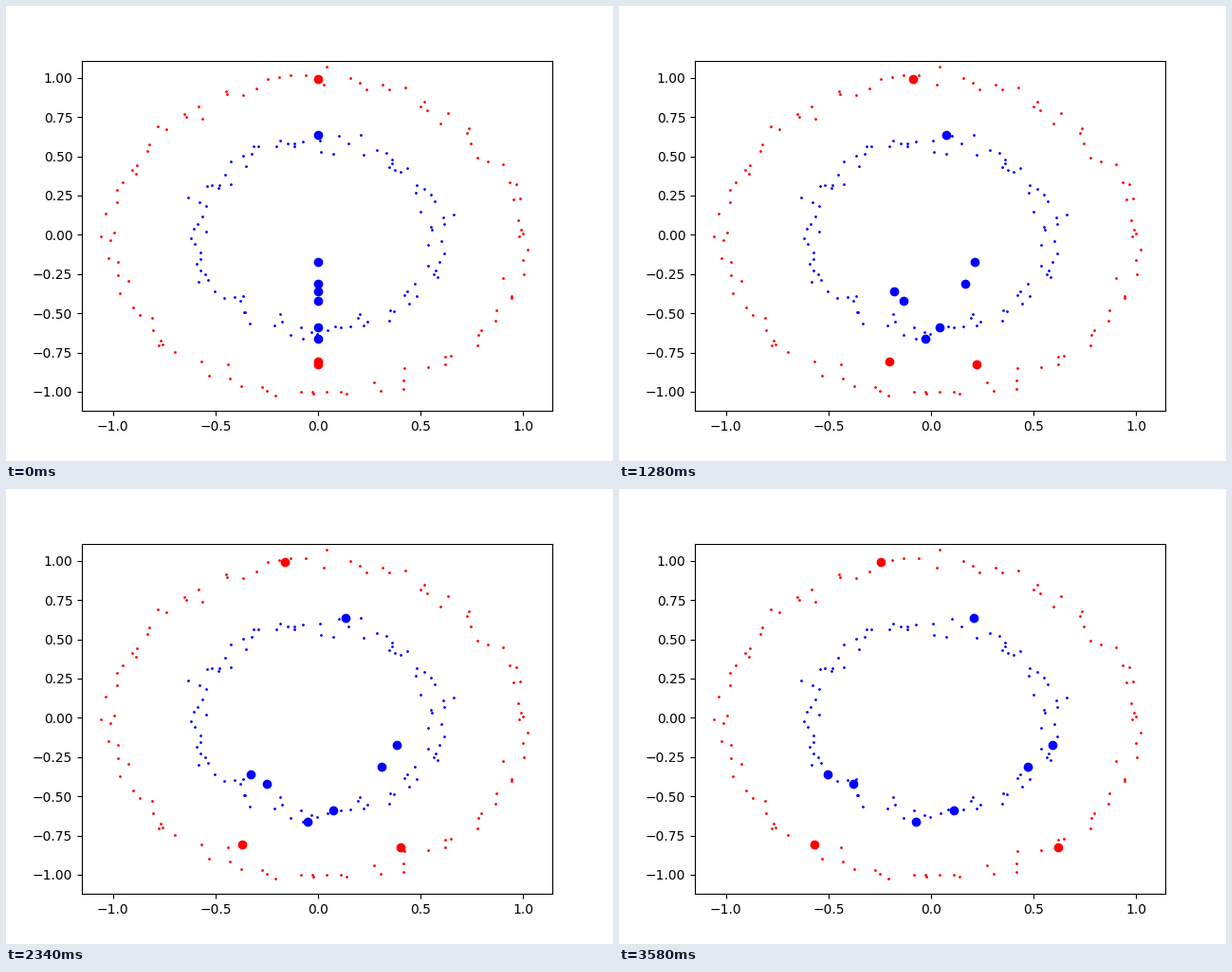
Animation of 640 by 480 pixels, one loop 3.6 s. Source, as a matplotlib script:

```python
import numpy as np
import matplotlib.pyplot as plt
from matplotlib.animation import FuncAnimation

FRAMES, INTERVAL = 180, 20
DOTS = 100      # dots per ring
NOISE = 0.035
ORIGIN_X, UNIT_X = 328.95, 216.2   # stage position of 0 and length of 1
ORIGIN_Y, UNIT_Y = 241.36, 165.6

# Places on the rings where the big dots arrive.
OUTER_ENDS = [(-0.245, 0.9925), (-0.568, -0.807), (0.618, -0.825)]
INNER_ENDS = [(0.208, 0.636), (0.591, -0.173), (0.472, -0.312),
              (-0.504, -0.360), (-0.379, -0.420), (0.111, -0.590),
              (-0.074, -0.662)]

rng = np.random.default_rng(7)


def noisy_ring(radius, ends):
    """Evenly spaced dots with jitter; the nearest ones move onto the ends."""
    step = 2 * np.pi / DOTS
    angles = step * np.arange(DOTS)
    ring = radius * np.column_stack([np.cos(angles), np.sin(angles)])
    ring += rng.normal(scale=NOISE, size=ring.shape)
    for x, y in ends:
        ring[round(np.arctan2(y, x) / step) % DOTS] = x, y
    return ring


fig, ax = plt.subplots(figsize=(6.4, 4.8), dpi=100)
ax.set_xlim((80 - ORIGIN_X) / UNIT_X, (576 - ORIGIN_X) / UNIT_X)
ax.set_ylim((ORIGIN_Y - 427.2) / UNIT_Y, (ORIGIN_Y - 57.6) / UNIT_Y)

movers = []
for radius, ends, color in [(1.0, OUTER_ENDS, "red"),
                            (0.6, INNER_ENDS, "blue")]:
    ax.plot(*noisy_ring(radius, ends).T, "o", color=color, markersize=1)
    x, y = np.array(ends).T
    line, = ax.plot(0 * x, y, "o", color=color, markersize=6, zorder=3)
    movers.append((line, x))


def update(i):
    t = i / (FRAMES - 1)
    for line, end in movers:
        line.set_xdata(end * t)
    return [line for line, _ in movers]


anim = FuncAnimation(fig, update, frames=FRAMES, interval=INTERVAL,
                     repeat=True, repeat_delay=0)
plt.show()
```
